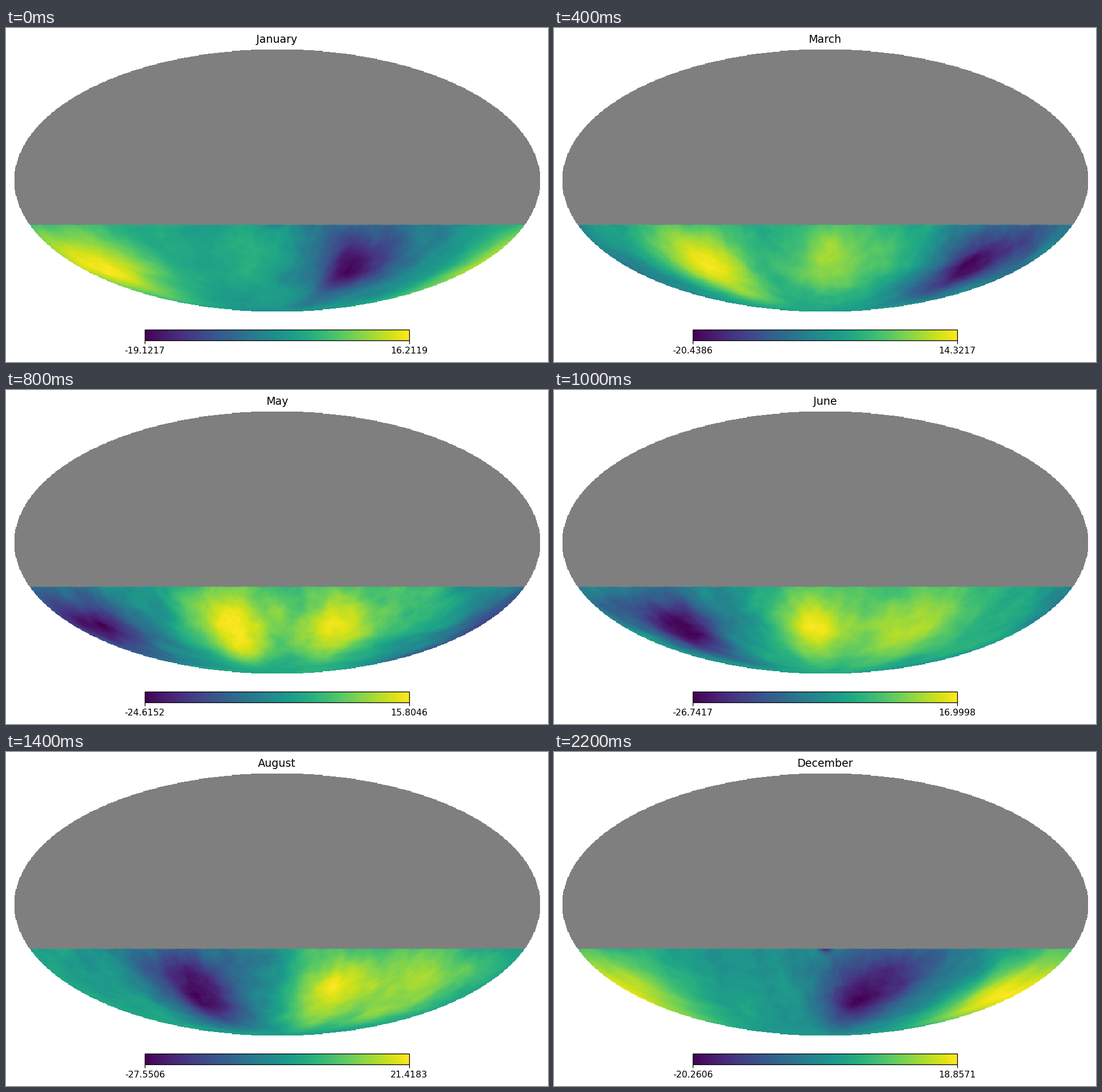
Recreate the animation shown at these times as a matplotlib script. Size 953 px wide and 588 px high, loop 2.4 s.

```python
import numpy as np
import matplotlib.pyplot as plt
from matplotlib.animation import FuncAnimation
from matplotlib.patches import Rectangle

W, H, DPI = 953, 588, 128
CX, CY, RX = 476.5, 269, 462.8
RY = RX / 2
PX = 72 / DPI             # points per pixel
DRIFT = 30                # degrees the weather pattern turns each month

# Month with the lowest and highest anomaly shown on the colour bar.
MONTHS = [
    ("January", -19.1217, 16.2119), ("February", -19.0119, 14.6473),
    ("March", -20.4386, 14.3217), ("April", -22.15, 14.7657),
    ("May", -24.6152, 15.8046), ("June", -26.7417, 16.9998),
    ("July", -27.3128, 19.2075), ("August", -27.5506, 21.4183),
    ("September", -25.9047, 22.4316), ("October", -23.9804, 22.2461),
    ("November", -22.3759, 20.6143), ("December", -20.2606, 18.8571),
]

# Mollweide map on 800 x 400 cells; data only in the toothed southern cap.
gx, gy = np.meshgrid(np.linspace(-1, 1, 800), np.linspace(1, -1, 400))
disc = gx ** 2 + gy ** 2 < 1
u = gx / np.sqrt(np.maximum(1 - gy ** 2, 1e-9))
teeth = .008 * (2 * np.abs((u * 128) % 1 - .5) - .5)
cap = disc & (gy < -.338 + teeth)

theta = np.arcsin(gy[cap])
z = (2 * theta + np.sin(2 * theta)) / np.pi
lon = 180 * u[cap]
south = -np.degrees(np.arcsin(z))
ring, turn = np.sqrt(1 - z * z), np.radians(lon)
ball = np.stack([ring * np.cos(turn), ring * np.sin(turn), z], -1)


def blob(lon0, lat0, wide, tall):
    d = (lon - lon0 + 180) % 360 - 180
    return np.exp(-(d / wide) ** 2 - ((south - lat0) / tall) ** 2)


def grain(seed, waves=110):
    """Cloudy texture: random plane waves cut by the sphere."""
    rng = np.random.default_rng(seed)
    total = np.zeros(len(ball))
    for k in np.geomspace(7, 190, waves):
        d = rng.normal(size=3)
        d *= k / np.linalg.norm(d)
        total += k ** -.75 * np.cos(ball @ d + rng.uniform(0, 2 * np.pi))
    return total / total.std()


def second_warm(age):
    """Slower warm lobe that grows, then merges into the main one."""
    grow = np.clip((age + .7) / 2.2, 0, 1)
    fade = np.clip((14.5 - age) / 2, 0, 1)
    return .8 * grow * fade * blob(330 + 21 * age, 48, 43, 27)


def anomaly(m):
    season = np.radians(DRIFT * m)
    wobble = 6 * np.cos(season - np.radians(150))
    base = DRIFT * m + wobble
    warm = blob(base + 195, 51, 35, 27)
    warm += second_warm(m) + second_warm(m + 12)
    cold = .55 * blob(base + 70, 52, 27, 19)
    cold += .6 * blob(base + 82, 45, 58, 36)
    calm_pole = 1 - np.exp(-((90 - south) / 9) ** 2)
    winter = max(0, np.cos(season + np.radians(30))) ** 8
    speck = blob(0, 24.5, 4.5, 2.5) * winter
    return calm_pole * (warm - cold) + .065 * grain(m + 1) - .7 * speck


def picture(m):
    _, lo, hi = MONTHS[m]
    a = anomaly(m)
    degrees = np.where(a > 0, a / a.max() * hi, a / a.min() * lo)
    img = np.zeros((400, 800, 4))
    img[disc] = (.5, .5, .5, 1)
    img[cap] = plt.cm.viridis((degrees - lo) / (hi - lo))
    return img


pictures = [picture(m) for m in range(12)]

plt.rcParams["font.family"] = "DejaVu Sans"
fig = plt.figure(figsize=(W / DPI, H / DPI), dpi=DPI, facecolor="white")
ax = fig.add_axes([0, 0, 1, 1])
ax.axis("off")

sky = ax.imshow(pictures[0], extent=(CX - RX, CX + RX, CY + RY, CY - RY),
                interpolation="nearest", aspect="auto")

LEFT, RIGHT, TOP, BOTTOM = 244, 709, 531, 550
ax.imshow(np.linspace(0, 1, 256)[None], cmap="viridis", aspect="auto",
          extent=(LEFT, RIGHT, BOTTOM, TOP), interpolation="nearest")
ax.add_patch(Rectangle((LEFT, TOP), RIGHT - LEFT, BOTTOM - TOP, fill=False,
                       ec="black", lw=1.27 * PX))
for x in (LEFT, RIGHT):
    ax.plot([x, x], [BOTTOM, BOTTOM + 5.5], color="black", lw=1.27 * PX,
            solid_capstyle="butt")
ax.set_xlim(0, W)
ax.set_ylim(H, 0)


def label(x, y, size):
    return ax.text(x, y, "", size=size * PX, ha="center", va="baseline")


title = label(CX, 26, 19)
low, high = label(LEFT, 573, 15.83), label(RIGHT, 573, 15.83)


def update(m):
    name, lo, hi = MONTHS[m]
    sky.set_data(pictures[m])
    title.set_text(name)
    low.set_text(f"{lo:g}")
    high.set_text(f"{hi:g}")
    return sky, title, low, high


anim = FuncAnimation(fig, update, frames=12, interval=200, repeat=True,
                     repeat_delay=0)
plt.show()
```
